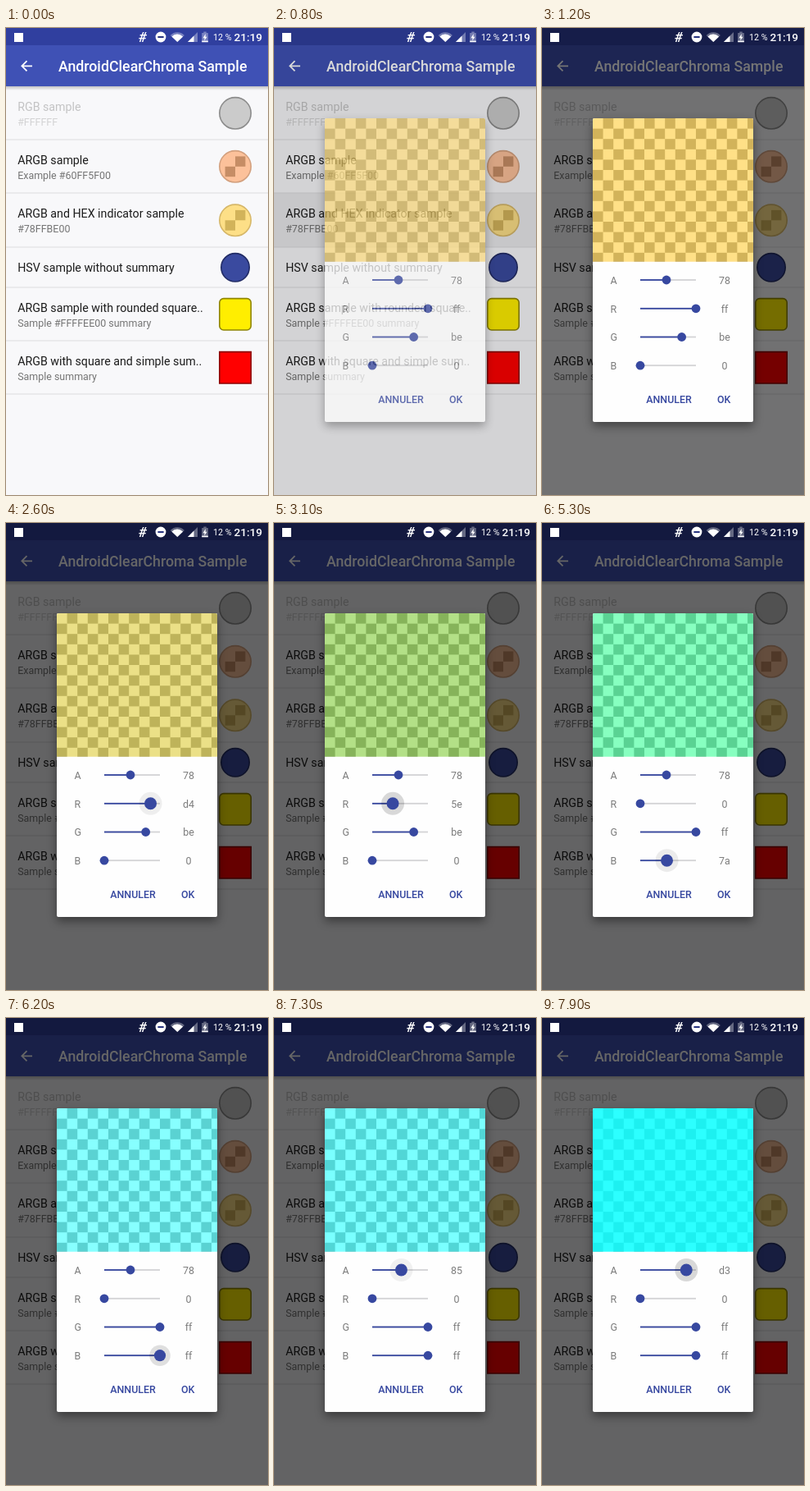
An HTML page with a canvas that plays this animation: 320 by 569 pixels, repeating every 8 s.

```html
<!DOCTYPE html>
<html lang="en">
<head>
<meta charset="utf-8">
<title>Color preference sample</title>
<style>
html, body { margin: 0; width: 100%; height: 100%; overflow: hidden; background: #fafafa; }
canvas { display: block; width: 320px; height: 569px; }
</style>
</head>
<body>
<canvas id="stage"></canvas>
<script>
const W = 320, H = 569, LOOP = 8000, STEP = 100;
const CELL = 12.6, FONT = 'Roboto, sans-serif', ACCENT = '#3748a0';
const dpr = Math.max(1, window.devicePixelRatio || 1);

function makeLayer(canvas) {
  canvas.width = W * dpr;
  canvas.height = H * dpr;
  const c = canvas.getContext('2d');
  c.scale(dpr, dpr);
  return c;
}
const stage = makeLayer(document.getElementById('stage'));
const layer = makeLayer(document.createElement('canvas'));

const clamp = v => Math.max(0, Math.min(1, v));

// Linear interpolation through [time, value] pairs
function track(t, keys) {
  if (t <= keys[0][0]) return keys[0][1];
  for (let i = 1; i < keys.length; i++) {
    const [t0, v0] = keys[i - 1], [t1, v1] = keys[i];
    if (t <= t1) return v0 + (v1 - v0) * (t - t0) / (t1 - t0);
  }
  return keys[keys.length - 1][1];
}

function rect(c, x, y, w, h, fill) {
  c.fillStyle = fill;
  c.fillRect(x, y, w, h);
}

function disc(c, x, y, r, fill) {
  c.beginPath();
  c.arc(x, y, r, 0, Math.PI * 2);
  c.fillStyle = fill;
  c.fill();
}

function poly(c, points, fill) {
  c.beginPath();
  points.forEach(([x, y]) => c.lineTo(x, y));
  c.closePath();
  c.fillStyle = fill;
  c.fill();
}

function roundPath(c, x, y, w, h, r) {
  c.beginPath();
  c.moveTo(x + r, y);
  c.arcTo(x + w, y, x + w, y + h, r);
  c.arcTo(x + w, y + h, x, y + h, r);
  c.arcTo(x, y + h, x, y, r);
  c.arcTo(x, y, x + w, y, r);
  c.closePath();
}

function label(c, text, x, y, size, fill, weight = 400, align = 'left') {
  c.font = `${weight} ${size}px ${FONT}`;
  c.textAlign = align;
  c.fillStyle = fill;
  c.fillText(text, x, y);
}

const rows = [
  { top: 71, end: 136, title: 'RGB sample', note: '#FFFFFF', off: true,
    r: 20, shape: 'circle', fill: '#cbcbcb', line: '#8c8c8c' },
  { top: 136, end: 201, title: 'ARGB sample', note: 'Example #60FF5F00',
    r: 20, shape: 'circle', fill: '#fcc19a', line: '#d3a07e', check: '#c68d65' },
  { top: 201, end: 267, title: 'ARGB and HEX indicator sample', note: '#78FFBE00',
    r: 20, shape: 'circle', fill: '#fddf87', line: '#d6b768', check: '#d2b35a' },
  { top: 267, end: 316, title: 'HSV sample without summary',
    r: 18, shape: 'circle', fill: '#3a4a9f', line: '#222c66' },
  { top: 316, end: 381, title: 'ARGB sample with rounded square..', note: 'Sample #FFFFEE00 summary',
    r: 20, shape: 'round', fill: '#ffee00', line: '#8f8500' },
  { top: 381, end: 446, title: 'ARGB with square and simple sum..', note: 'Sample summary',
    r: 20, shape: 'square', fill: '#ff0000', line: '#8c0000' }
];

function swatch(c, s) {
  const x = 280, y = (s.top + s.end) / 2 + 0.3, r = s.r - 0.8;
  const outline = () => {
    if (s.shape === 'circle') {
      c.beginPath();
      c.arc(x, y, r, 0, Math.PI * 2);
    } else {
      roundPath(c, x - r, y - r, 2 * r, 2 * r, s.shape === 'round' ? 5 : 0);
    }
  };
  outline();
  c.fillStyle = s.fill;
  c.fill();
  if (s.check) {
    rect(c, x, y - 12.4, 12.4, 12.4, s.check);
    rect(c, x - 12.4, y, 12.4, 12.4, s.check);
  }
  outline();
  c.strokeStyle = s.line;
  c.lineWidth = 1.6;
  c.stroke();
}

function list(c, t) {
  rect(c, 0, 0, W, H, '#f8f8fa');
  const pressed = track(t, [[400, 0], [600, 0.06], [900, 0.05], [1300, 0]]);
  if (pressed) rect(c, 0, 201, W, 66, `rgba(0,0,0,${pressed})`);
  for (const s of rows) {
    const base = s.note ? s.top + 30 : s.top + 30.2;
    label(c, s.title, 14.2, base, 14.22, s.off ? '#c3c3c4' : '#1c1c1c');
    if (s.note) label(c, s.note, 14.2, base + 17.6, 12.44, s.off ? '#d3d3d4' : '#757575');
    rect(c, 0, s.end - 0.5, W, 1, '#dedee0');
    swatch(c, s);
  }
  const g = c.createLinearGradient(0, 71, 0, 76);
  g.addColorStop(0, 'rgba(0,0,0,.22)');
  g.addColorStop(1, 'rgba(0,0,0,0)');
  rect(c, 0, 71, W, 5, g);
}

function toolbar(c) {
  rect(c, 0, 0, W, 21, '#303f9f');
  rect(c, 0, 21, W, 50, '#3f51b5');
  c.strokeStyle = '#fff';
  c.lineWidth = 1.8;
  c.beginPath();
  c.moveTo(32, 46.3);
  c.lineTo(19.5, 46.3);
  c.moveTo(25.5, 40.2);
  c.lineTo(19.4, 46.3);
  c.lineTo(25.5, 52.4);
  c.stroke();
  label(c, 'AndroidClearChroma Sample', 64, 53, 17.78, '#fff', 500);
}

function statusIcons(c) {
  const soft = 'rgba(255,255,255,.35)';
  rect(c, 10, 6, 11, 11, '#fff');
  label(c, '#', 167, 17, 17, '#fff', 'italic 700', 'center');
  disc(c, 189, 11, 6.4, '#fff');
  rect(c, 185.4, 10, 7.2, 2, '#27337f');

  // Wi-Fi fan
  const fan = (r, fill) => {
    c.beginPath();
    c.moveTo(209.3, 17);
    c.arc(209.3, 17, r, -Math.PI * 0.76, -Math.PI * 0.24);
    c.closePath();
    c.fillStyle = fill;
    c.fill();
  };
  fan(11.8, soft);
  fan(9.4, '#fff');

  // Signal and battery
  poly(c, [[222, 17], [234, 17], [234, 5]], soft);
  poly(c, [[222, 17], [229.5, 17], [229.5, 9.5]], '#fff');
  rect(c, 241.3, 4.5, 3.4, 1.5, soft);
  rect(c, 239.2, 6, 7.6, 11.2, soft);
  rect(c, 239.2, 15.6, 7.6, 1.6, '#fff');
  poly(c, [[243.8, 7], [240.5, 12.3], [242.6, 12.3], [242.2, 15.6], [245.5, 10.8], [243.5, 10.8]], '#fff');

  label(c, '12 %', 253, 15.2, 10.7, '#fff');
  label(c, '21:19', 313, 16, 13.6, '#fff', 500, 'right');
}

const sliders = [
  { name: 'A', y: 307, down: 7050, up: 9000,
    keys: [[7200, 120], [7900, 211]] },
  { name: 'R', y: 341.8, down: 2300, up: 3700,
    keys: [[2350, 255], [2600, 212], [3500, 0]] },
  { name: 'G', y: 376.5, down: 3980, up: 4700,
    keys: [[3900, 190], [4000, 216], [4500, 255]] },
  { name: 'B', y: 411.2, down: 4950, up: 6150,
    keys: [[4950, 0], [5300, 122], [5700, 255]] }
];

function slider(c, s, t, value) {
  const x = 120 + 68 * value / 255;
  const release = 1 - clamp((t - s.up) / 250);
  const grow = clamp((t - s.down) / 200) * release;
  const halo = clamp((t - s.down) / 700) * release * 0.15;
  label(c, s.name, 83.5, s.y + 4.8, 12.44, '#7c7c7c');
  label(c, value.toString(16), 223, s.y + 4.8, 12.44, '#7c7c7c', 400, 'center');
  rect(c, 120, s.y - 0.9, 68, 1.8, '#d3d3d5');
  rect(c, 120, s.y - 0.9, x - 120, 1.8, ACCENT);
  if (halo) disc(c, x, s.y, 8 + 6 * grow, `rgba(0,0,0,${halo})`);
  disc(c, x, s.y, 5.4 + 2.1 * grow, ACCENT);
}

function dialog(c, t) {
  c.clearRect(0, 0, W, H);
  c.save();
  c.shadowColor = 'rgba(0,0,0,.42)';
  c.shadowBlur = 12 * dpr;
  c.shadowOffsetY = 5 * dpr;
  roundPath(c, 62, 110, 196, 370, 2);
  c.fillStyle = '#fefefe';
  c.fill();
  c.restore();

  const [a, r, g, b] = sliders.map(s => Math.round(track(t, s.keys)));
  c.save();
  roundPath(c, 62, 110, 196, 370, 2);
  c.clip();
  c.beginPath();
  c.rect(62, 110, 196, 174.7);
  c.clip();
  rect(c, 62, 110, 196, 175, '#fff');
  for (let j = 0; j < 14; j++) {
    for (let i = (j + 1) % 2; i < 16; i += 2) {
      rect(c, 62 + i * CELL, 110 + j * CELL, CELL, CELL, '#aaa');
    }
  }
  rect(c, 62, 110, 196, 175, `rgba(${r},${g},${b},${a / 255})`);
  c.restore();

  sliders.forEach((s, i) => slider(c, s, t, [a, r, g, b][i]));
  label(c, 'ANNULER', 127.2, 456.5, 12.44, ACCENT, 500);
  label(c, 'OK', 214, 456.5, 12.44, ACCENT, 500);
}

function draw(t) {
  const c = stage;
  list(c, t);
  toolbar(c);
  const dim = track(t, [[700, 0], [800, 0.15], [1000, 0.42], [1300, 0.6]]);
  rect(c, 0, 0, W, H, `rgba(0,0,0,${dim})`);
  statusIcons(c);
  const show = track(t, [[600, 0], [700, 0.35], [800, 0.75], [1000, 1]]);
  if (show) {
    dialog(layer, t);
    c.globalAlpha = show;
    c.drawImage(layer.canvas, 0, 0, W, H);
    c.globalAlpha = 1;
  }
}

const start = performance.now();
function tick() {
  const t = (performance.now() - start) % LOOP;
  draw(Math.floor(t / STEP) * STEP);
  requestAnimationFrame(tick);
}
tick();
</script>
</body>
</html>
```
